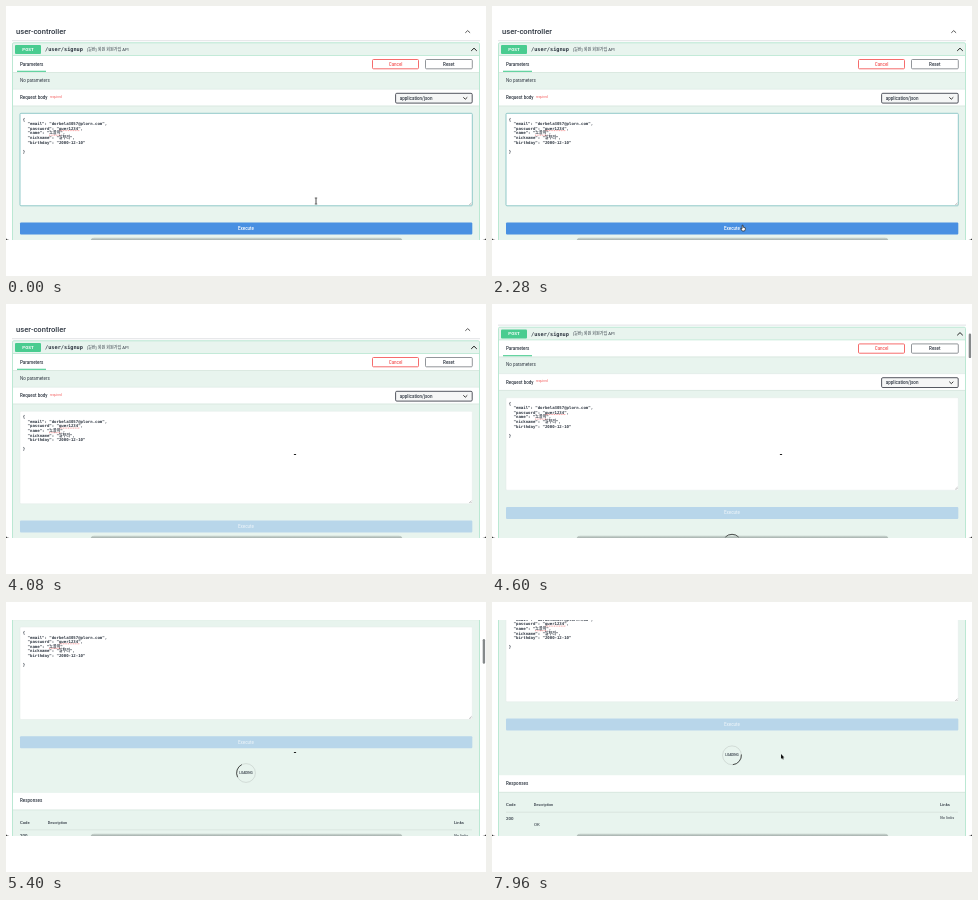
An HTML page with a canvas that plays this animation: 480x270 px, repeating every 8 s.

```html
<!DOCTYPE html>
<html lang="ko">
<head>
<meta charset="utf-8">
<title>API console</title>
<style>
  html, body { margin: 0; width: 100%; height: 100%; overflow: hidden; background: #fff; }
  canvas { display: block; width: 480px; height: 270px; }
</style>
</head>
<body>
<canvas id="stage"></canvas>
<script>
const LOOP = 8000, W = 480, H = 270, TOP = 18, BOTTOM = 234;
const INK = '#2f3742', TINT = '#e8f4ee', GREEN = '#49cc90', PALE = '#b5e6d0', BLUE = '#4990e2', RED = '#f45c5c';
const SANS = 'Roboto, "Noto Sans CJK KR", "Noto Sans CJK", sans-serif';
const MONO = '"DejaVu Sans Mono", "Noto Sans CJK KR", "Noto Sans CJK", monospace';
const BODY = [
  '{',
  '  "email": "dorbela3057@plorn.com",',
  '  "password": "qwer1234",',
  '  "name": "노을이",',
  '  "nickname": "달무리",',
  '  "birthday": "2000-12-10"',
  '',
  '}'
];

const canvas = document.getElementById('stage');
const g = canvas.getContext('2d');
const ratio = window.devicePixelRatio || 1;
canvas.width = W * ratio;
canvas.height = H * ratio;

const clamp = v => Math.max(0, Math.min(1, v));
const span = (t, a, b) => clamp((t - a) / (b - a));
const smooth = p => p * p * (3 - 2 * p);
const mix = (a, b, p) => a + (b - a) * p;

function rect(x, y, w, h, fill) {
  g.fillStyle = fill;
  g.fillRect(x, y, w, h);
}

function box(x, y, w, h, r, fill, stroke, width = 0.8) {
  g.beginPath();
  g.roundRect(x, y, w, h, r);
  if (fill) { g.fillStyle = fill; g.fill(); }
  if (stroke) { g.strokeStyle = stroke; g.lineWidth = width; g.stroke(); }
}

function line(points, color, width = 0.8) {
  g.beginPath();
  points.forEach(([x, y]) => g.lineTo(x, y));
  g.strokeStyle = color;
  g.lineWidth = width;
  g.stroke();
}

function text(s, x, y, size, { color = INK, weight = 400, family = SANS, align = 'left' } = {}) {
  g.font = `${weight} ${size}px ${family}`;
  g.fillStyle = color;
  g.textAlign = align;
  g.textBaseline = 'alphabetic';
  g.fillText(s, x, y + size * 0.35);
}

const bold = (s, x, y, size = 4.5, color = INK) => text(s, x, y, size, { weight: 500, color });
const label = (s, x, y, color, size = 4.5) => text(s, x, y, size, { weight: 500, color, align: 'center' });

// Two flicks of the wheel, each slowing down exponentially.
function scrollAt(t) {
  const flick = (start, tau) => t < start ? 0 : 1 - Math.exp(-(t - start) / tau);
  const first = 32 * flick(4480, 219);
  return mix(first, 100, flick(5240, 119));
}

function pointerAt(t) {
  const a = smooth(span(t, 960, 2240));
  const nudge = 2 * smooth(span(t, 2680, 2960));
  const b = smooth(span(t, 3540, 4060));
  const x = mix(mix(310, 251, a) - nudge, 289, b);
  const y = mix(mix(195, 222, a), 150.5, b);
  if (t >= 6200) return { x: 289, y: 152, kind: 'arrow' };
  if (t >= 3520) return { x, y, kind: y > 216 ? 'hand' : 'dot' };
  return { x, y, kind: y < 200 ? 'beam' : y < 216 ? 'arrow' : 'hand' };
}

function drawHeader() {
  bold('user-controller', 10, 25.6, 7.6);
  line([[459.3, 26.8], [461.7, 24.6], [464.1, 26.8]], '#444', 0.9);
  line([[6, 34.7], [474, 34.7]], '#d5d7da', 0.7);
}

function drawSummary() {
  box(9, 39, 26, 9, 1, GREEN);
  text('POST', 22, 43.5, 4.4, { color: '#fff', weight: 700, align: 'center' });
  text('/user/signup', 39, 43.3, 5.25, { weight: 700, family: MONO });
  text('[일반] 회원 회원가입 API', 81, 43.3, 4.1);
  line([[465.2, 44.9], [468, 42.2], [470.8, 44.9]], '#222', 1);
  line([[6.5, 49.6], [473.5, 49.6]], PALE, 0.8);
}

function drawParameters() {
  rect(7, 50, 466, 16.3, '#fff');
  line([[7, 66.5], [473, 66.5]], '#d3e2da', 0.7);
  bold('Parameters', 14, 58);
  line([[11, 65.3], [40, 65.3]], GREEN, 1.1);
  box(366.5, 53.5, 46, 9.3, 1, '#fff', RED, 0.9);
  label('Cancel', 389.6, 58.1, RED);
  box(419.5, 53.5, 46.8, 9.3, 1, '#fff', '#767b80', 0.8);
  label('Reset', 442.8, 58.1, INK);
  text('No parameters', 14, 74.3, 4.5);
}

function drawRequest(focused) {
  rect(7, 83.2, 466, 16.6, '#fff');
  line([[7, 83.2], [473, 83.2]], '#dce8e2', 0.6);
  line([[7, 100], [473, 100]], '#d3e2da', 0.7);
  bold('Request body', 14, 91.6);
  text('required', 43.8, 90.4, 3.3, { color: RED });
  box(389.6, 87.3, 76.6, 9.8, 1.2, '#f5f6f6', '#41444e', 0.9);
  bold('application/json', 393.8, 92, 4.5);
  line([[457.3, 91.3], [459.3, 93.2], [461.3, 91.3]], '#222', 0.9);

  box(14, 107.3, 452.3, 92.5, 1, '#fff', focused ? '#86c3c3' : '#e3ebe7', focused ? 0.9 : 0.5);
  line([[463.2, 199], [465.6, 196.6]], '#888', 0.5);
  line([[464.6, 199], [465.6, 198]], '#888', 0.5);
  const y0 = focused ? 113.4 : 112.9;
  BODY.forEach((s, i) => text(s, 16.8, y0 + i * 4.56, 4, { weight: 700, family: MONO }));
  wave(53.5, 74, y0 + 11.2);
  wave(43, 55, y0 + 15.8);
}

function wave(x1, x2, y) {
  g.setLineDash([1, 0.7]);
  line([[x1, y], [x2, y]], 'rgba(240,70,70,.75)', 0.7);
  g.setLineDash([]);
}

function drawExecute(t) {
  g.globalAlpha = mix(1, 0.3, smooth(span(t, 3560, 3860)));
  box(14, 216.6, 452.3, 12, 1, BLUE);
  g.globalAlpha = mix(1, 0.65, span(t, 3560, 3860));
  label('Execute', 240, 222.4, '#fff');
  g.globalAlpha = 1;
}

function drawSpinner(t) {
  if (t < 3560) return;
  const x = 240, y = 253.3, r = 9.4;
  const turn = (t - 4600) / 1000 * Math.PI * 2 - Math.PI / 2;
  g.lineWidth = 0.7;
  g.strokeStyle = 'rgba(85,85,85,.22)';
  g.beginPath();
  g.arc(x, y, r, 0, Math.PI * 2);
  g.stroke();
  g.lineWidth = 0.95;
  g.strokeStyle = 'rgba(0,0,0,.7)';
  g.beginPath();
  g.arc(x, y, r, turn - Math.PI / 4, turn + Math.PI / 4);
  g.stroke();
  label('LOADING', x, y - 0.1, INK, 3.2);
}

function drawResponses() {
  rect(7, 273.2, 466, 16.8, '#fff');
  line([[7, 290.3], [473, 290.3]], '#d3e2da', 0.7);
  bold('Responses', 14, 281.2);
  bold('Code', 14, 303, 4.2);
  bold('Description', 41.8, 303, 3.8);
  bold('Links', 448, 303, 4.2);
  line([[14, 310.2], [466, 310.2]], '#cfdbd5', 0.6);
  text('200', 14, 316, 4.4, { weight: 500 });
  text('OK', 42, 322, 4.4);
  text('No links', 448, 316, 4.1, { weight: 'italic 400' });
}

function drawScrollbar(t, scroll) {
  const alpha = span(t, 4480, 4520) * (1 - span(t, 6650, 6900));
  if (!alpha) return;
  g.globalAlpha = alpha;
  box(476.7, 28 + scroll * 0.11, 2.4, 24.6, 1.2, '#85898a');
  g.globalAlpha = 1;
}

function drawDock() {
  const shade = g.createLinearGradient(0, 231.2, 0, BOTTOM);
  shade.addColorStop(0, 'rgba(110,120,118,.12)');
  shade.addColorStop(1, 'rgba(110,120,118,.55)');
  box(84.5, 231.6, 312, 12, 4, shade);
  g.fillStyle = '#111';
  [[0, 1], [W, -1]].forEach(([x, d]) => {
    g.beginPath();
    g.moveTo(x, 231.8);
    g.quadraticCurveTo(x, BOTTOM, x + d * 3.5, BOTTOM);
    g.lineTo(x, BOTTOM);
    g.fill();
  });
}

function shape(points, x, y) {
  g.beginPath();
  points.forEach(([px, py]) => g.lineTo(x + px, y + py));
  g.closePath();
}

function drawPointer({ x, y, kind }) {
  if (kind === 'beam') {
    line([[x, y - 2.8], [x, y + 2.8]], '#222', 0.8);
    line([[x - 1.2, y - 3], [x + 1.2, y - 3]], '#222', 0.7);
    line([[x - 1.2, y + 3], [x + 1.2, y + 3]], '#222', 0.7);
  } else if (kind === 'arrow') {
    shape([[0, 0], [0, 4.8], [1.1, 3.9], [1.9, 5.6], [2.7, 5.2], [2, 3.6], [3.4, 3.5]], x, y);
    g.fillStyle = '#111';
    g.fill();
  } else if (kind === 'hand') {
    shape([[-0.9, -2.8], [0, -2.8], [0.2, -0.8], [2.3, -0.2], [2.3, 1.4], [1.5, 3], [-0.8, 3], [-2.3, 0.6], [-0.9, 0.6]], x, y);
    g.fillStyle = '#fff';
    g.fill();
    g.strokeStyle = '#222';
    g.lineWidth = 0.7;
    g.stroke();
  } else {
    line([[x - 1.1, y], [x + 1.1, y]], '#222', 1);
  }
}

function draw(t) {
  const scroll = scrollAt(t);
  g.setTransform(ratio, 0, 0, ratio, 0, 0);
  rect(0, 0, W, H, '#fff');
  g.save();
  g.beginPath();
  g.rect(0, TOP, W, BOTTOM - TOP);
  g.clip();

  g.save();
  g.translate(0, -scroll);
  drawHeader();
  box(6.5, 36.8, 467, 330, 1.3, TINT, PALE, 0.9);
  drawSummary();
  drawParameters();
  drawRequest(t < 3560);
  drawExecute(t);
  drawSpinner(t);
  drawResponses();
  g.restore();

  drawScrollbar(t, scroll);
  drawDock();
  drawPointer(pointerAt(t));
  g.restore();
}

const start = performance.now();
function tick() {
  draw((performance.now() - start) % LOOP);
  requestAnimationFrame(tick);
}
tick();
</script>
</body>
</html>
```
